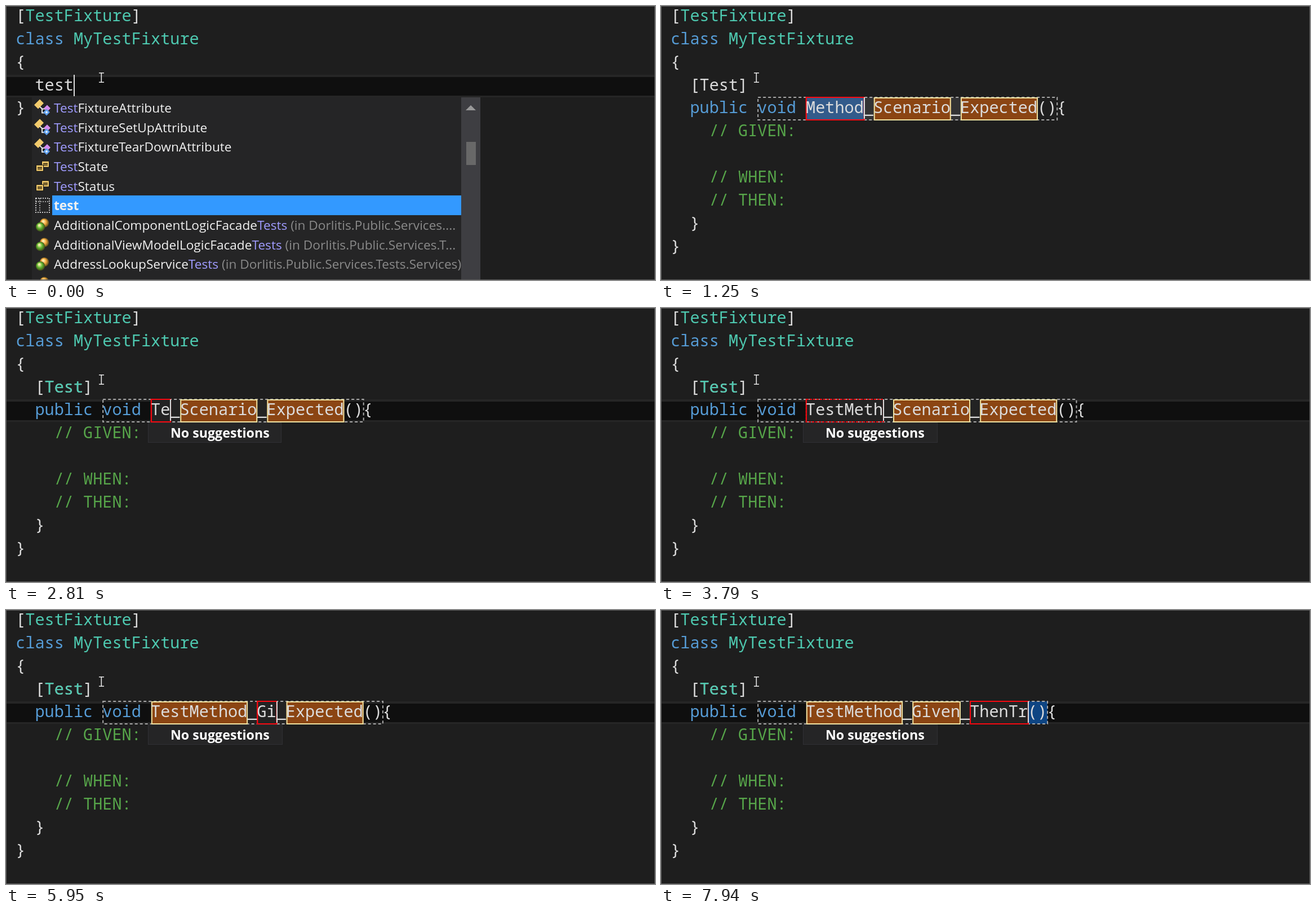
These frames come from a looping animation (1152 px wide and 486 px high, 8000 ms). An HTML page with a canvas:

```html
<!DOCTYPE html>
<html lang="en">
<head>
<meta charset="utf-8">
<title>Test template</title>
<style>
  html, body { margin: 0; width: 100%; height: 100%; overflow: hidden; background: #1e1e1e; }
  canvas { display: block; }
</style>
</head>
<body>
<canvas id="stage" width="1152" height="486"></canvas>
<script>
const ctx = document.getElementById('stage').getContext('2d');
const LOOP = 8000, CELL = 17.13, ROW = 40.85;
const MONO = '28.55px "Noto Sans Mono", monospace';
const LIST = '22.65px "Open Sans", sans-serif';
const BOLD = 'bold 22.65px "Open Sans", sans-serif';
const C = { bg: '#1e1e1e', text: '#dcdcdc', keyword: '#569cd6', type: '#4ec9b0', comment: '#57a64a',
  menu: '#252526', match: '#a09cff', dim: '#8a8a8a', gold: '#f2cb6c', active: '#f80810' };

// time, the three template fields, index of the active one
const steps = [
  [1250, 'Method', 'Scenario', 'Expected', 0],
  [2570, 'T', 'Scenario', 'Expected', 0],
  [2810, 'Te', 'Scenario', 'Expected', 0],
  [3090, 'Tes', 'Scenario', 'Expected', 0],
  [3240, 'Test', 'Scenario', 'Expected', 0],
  [3360, 'TestM', 'Scenario', 'Expected', 0],
  [3490, 'TestMe', 'Scenario', 'Expected', 0],
  [3790, 'TestMeth', 'Scenario', 'Expected', 0],
  [3910, 'TestMethod', 'Scenario', 'Expected', 0],
  [4420, 'TestMethod', 'Scenario', 'Expected', 1],
  [5830, 'TestMethod', 'G', 'Expected', 1],
  [5950, 'TestMethod', 'Gi', 'Expected', 1],
  [6100, 'TestMethod', 'Giv', 'Expected', 1],
  [6380, 'TestMethod', 'Given', 'Expected', 1],
  [6650, 'TestMethod', 'Given', 'Expected', 2],
  [6800, 'TestMethod', 'Given', 'T', 2],
  [7450, 'TestMethod', 'Given', 'Th', 2],
  [7570, 'TestMethod', 'Given', 'Then', 2],
  [7690, 'TestMethod', 'Given', 'ThenT', 2],
  [7940, 'TestMethod', 'Given', 'ThenTr', 2]
];
const typing = [[2570, 4420], [5830, 6650], [6800, LOOP]];
const hint = [[2690, 4280], [5950, 6650], [6920, LOOP]];
const green = [[1520, 2570], [4660, 5830]];
const caretOff = [[160, 300], [700, 1250], [1640, 2170], [4820, 5400]];

// icon, then text parts: plain, matched, plain, dimmed
const items = [
  [attribute, '', 'Test', 'FixtureAttribute'],
  [attribute, '', 'Test', 'FixtureSetUpAttribute'],
  [attribute, '', 'Test', 'FixtureTearDownAttribute'],
  [enumeration, '', 'Test', 'State'],
  [enumeration, '', 'Test', 'Status'],
  [snippet, 'test'],
  [balls, 'AdditionalComponentLogicFacade', 'Tests', '', ' (in Dorlitis.Public.Services....'],
  [balls, 'AdditionalViewModelLogicFacade', 'Tests', '', ' (in Dorlitis.Public.Services.T...'],
  [balls, 'AddressLookupService', 'Tests', '', ' (in Dorlitis.Public.Services.Tests.Services)'],
  [balls, 'AddressModelValidator', 'Tests', '', ' (in Dorlitis.Public.Services.Tests)']
];

const within = (spans, t) => spans.some(([from, to]) => t >= from && t < to);
const colX = col => 18 + col * CELL;

function rect(x, y, w, h, color) {
  ctx.fillStyle = color;
  ctx.fillRect(x, y, w, h);
}

function outline(x, y, w, h, color, width = 2, dash = []) {
  ctx.strokeStyle = color;
  ctx.lineWidth = width;
  ctx.setLineDash(dash);
  ctx.strokeRect(x, y, w, h);
  ctx.setLineDash([]);
}

function polygon(color, ...points) {
  ctx.fillStyle = color;
  ctx.beginPath();
  points.forEach(([x, y]) => ctx.lineTo(x, y));
  ctx.fill();
}

function line(color, width, ...points) {
  ctx.strokeStyle = color;
  ctx.lineWidth = width;
  ctx.beginPath();
  points.forEach(([x, y]) => ctx.lineTo(x, y));
  ctx.stroke();
}

function print(text, x, y, color, font) {
  ctx.font = font;
  ctx.fillStyle = color;
  ctx.fillText(text, x, y);
  return x + ctx.measureText(text).width;
}

const code = (row, col, text, color = C.text) => print(text, colX(col) - 0.8, 27 + row * ROW, color, MONO);

function currentLine(row) {
  const y = Math.round(row * ROW - 1);
  rect(0, y, 1152, 40, '#262626');
  rect(0, y + 4, 1152, 33, '#0f0f0f');
}

function caret(row, col) {
  rect(Math.round(colX(col)) - 1, Math.round(row * ROW - 1), 2, 38, C.text);
}

const diamond = (x, y, r, color) => polygon(color, [x - r, y], [x, y - r], [x + r, y], [x, y + r]);

function attribute(y) {
  polygon(C.gold, [50, y - 6], [60, y - 16], [67, y - 9], [57, y + 1]);
  line('#e8e8e8', 2, [60, y - 3], [64, y + 1], [64, y + 8], [70, y + 8]);
  line('#e8e8e8', 2, [64, y + 1], [72, y + 1]);
  diamond(73, y, 6, '#d58cf0');
  diamond(72, y + 7, 6, '#5b9bea');
  diamond(72, y + 7, 2.5, '#d8ecff');
}

function enumeration(y) {
  [[64, y - 10], [54, y - 3]].forEach(([x, top]) => {
    rect(x - 1, top - 1, 14, 12, '#111');
    rect(x, top, 12, 10, C.gold);
    rect(x + 2, top + 3, 8, 2, '#3a2c10');
    rect(x + 2, top + 6, 8, 1.5, '#3a2c10');
  });
}

function snippet(y) {
  outline(53, y - 14, 24, 25, '#c8c8c8', 2, [2, 2]);
  ctx.setLineDash([2, 2]);
  line('#c8c8c8', 1.5, [60, y - 14], [60, y + 11]);
  line('#c8c8c8', 1.5, [53, y - 8], [77, y - 8]);
  ctx.setLineDash([]);
}

function balls(y) {
  [[68, y - 5, '#f0a63c'], [61, y + 2, '#62b832']].forEach(([x, cy, color]) => {
    const shade = ctx.createRadialGradient(x - 2, cy - 3, 1, x, cy, 9);
    shade.addColorStop(0, '#fff0b0');
    shade.addColorStop(0.45, color);
    shade.addColorStop(1, '#3c3a14');
    ctx.fillStyle = shade;
    ctx.beginPath();
    ctx.arc(x, cy, 8.2, 0, 7);
    ctx.fill();
  });
}

function completionList() {
  rect(46, 162, 796, 324, C.menu);
  rect(808, 162, 34, 324, '#3e3e42');
  polygon('#999', [816, 185], [825, 176], [834, 185]);
  rect(817, 241, 17, 41, '#686868');
  rect(82, 336, 726, 35, '#3399ff');
  items.forEach(([icon, ...parts], i) => {
    const y = 181.5 + i * 34.7;
    icon(y);
    let x = 85;
    parts.forEach((part, k) => {
      const color = k === 1 ? C.match : k === 3 ? C.dim : '#f1f1f1';
      x = print(part, x, y + 7.3, color, icon === snippet ? BOLD : LIST);
    });
  });
}

function template(t) {
  const [, a, b, c, active] = steps.filter(s => s[0] <= t).pop();
  const fields = [a, b, c], busy = within(typing, t), marked = within(green, t);
  const name = fields.join('_'), end = 14 + name.length;

  code(3, 2, '[Test]');
  if (t >= 1520) code(3, 3, 'Test', C.type);
  if (busy) currentLine(4);
  rect(colX(14), 162, name.length * CELL, 41, busy ? '#232323' : marked ? '#4b7523' : '#333334');
  if (t >= 7170) rect(colX(end), 162, 2 * CELL, 40, '#0e4583');
  outline(colX(9), 162, (end - 7) * CELL, 40, '#a8a8a8', 2, [5, 4]);

  let col = 14, caretCol;
  fields.forEach((field, i) => {
    const x = colX(col), w = field.length * CELL;
    if (i === active) {
      if (!busy) rect(x, 162, w, 40, marked ? '#44807a' : '#335b8b');
      outline(x, 162, w, 40, C.active, 2, field.length > 7 ? [4, 2] : []);
      rect(x - 1, 161, 2, 42, C.active);
      caretCol = col + field.length;
    } else {
      rect(x, 162, w, 41, '#8b4513');
      outline(x + 1, 163, w - 2, 39, '#f0e2a0');
    }
    col += field.length + 1;
  });

  code(4, 2, 'public void', C.keyword);
  code(4, 14, name + '(){');
  if (!within(caretOff, t)) caret(4, caretCol);
  code(5, 4, '// GIVEN:', C.comment);
  code(7, 4, '// WHEN:', C.comment);
  code(8, 4, '// THEN:', C.comment);
  code(9, 2, '}');
  code(10, 0, '}');

  if (within(hint, t)) {
    const w = t < 3090 ? 236 : 238;
    rect(252, 203, w, 36, C.menu);
    outline(252.5, 203.5, w, 35, '#303034', 1);
    print('No suggestions', 292, 230, '#fff', 'bold 23.2px "Open Sans", sans-serif');
  }
}

function draw(t) {
  rect(0, 0, 1152, 486, C.bg);
  code(0, 0, '[');
  code(0, 1, 'TestFixture', C.type);
  code(0, 12, ']');
  code(1, 0, 'class', C.keyword);
  code(1, 6, 'MyTestFixture', C.type);
  code(2, 0, '{');
  if (t < 1250) {
    currentLine(3);
    code(3, 2, 'test');
    code(4, 0, '}');
    if (!within(caretOff, t)) caret(3, 6);
    if (t < 1100) completionList();
  } else {
    template(t);
  }
  // mouse pointer
  rect(168.5, 119, 1.6, 16, '#e8e8e8');
  rect(165, 118, 9, 1.5, '#e8e8e8');
  rect(165, 134.5, 9, 1.5, '#e8e8e8');
  outline(0.5, 0.5, 1151, 485, '#5a5a5a', 1);
}

function tick() {
  draw(performance.now() % LOOP);
  requestAnimationFrame(tick);
}
tick();
</script>
</body>
</html>
```
